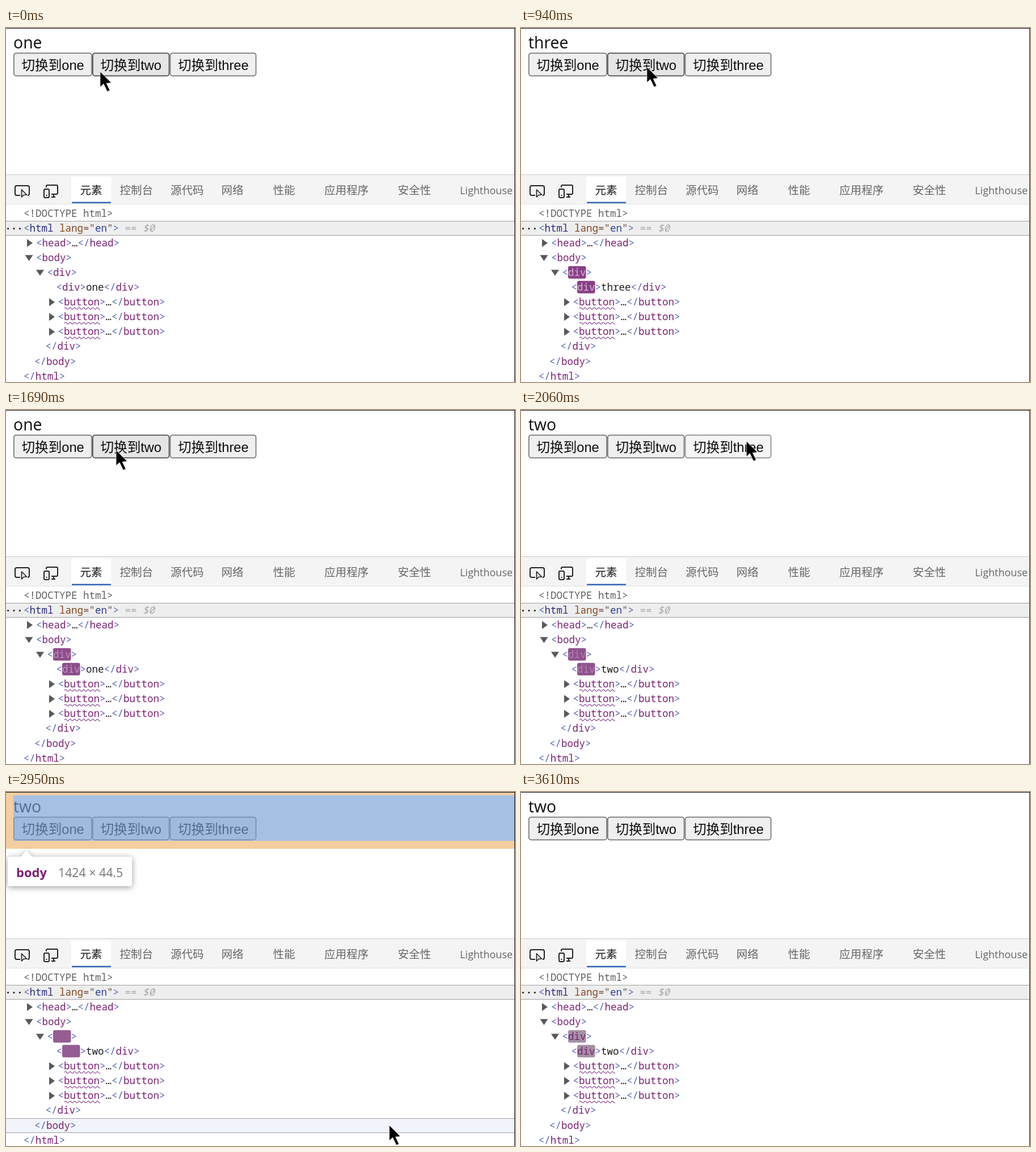
Write an HTML page with a canvas that moves like this. It is 897 by 624 pixels and loops after 3.66 s.

```html
<!DOCTYPE html>
<html lang="zh">
<head>
<meta charset="utf-8">
<style>
html, body { margin: 0; width: 100%; height: 100%; overflow: hidden; background: #fff; }
canvas { display: block; }
</style>
</head>
<body>
<canvas id="stage" width="897" height="624"></canvas>
<script>
const ctx = document.getElementById('stage').getContext('2d');
const LOOP = 3660, TICKS = 78, STEP = LOOP / TICKS;
const ROW = 26.05;
const UI = '"Open Sans", "Noto Sans", "Noto Sans CJK SC", sans-serif';
const CJK = '"Noto Sans CJK SC", "Noto Sans CJK", "Noto Sans", sans-serif';
const BUTTON_FONT = '23.6px "Liberation Sans", "Noto Sans CJK SC", "Noto Sans CJK", sans-serif';
const MONO = '17.5px "Noto Sans Mono", monospace';
const BRACKET = '#5465b4', TAG = '#7b2175';

// aim: where the pointer rests when it clicks the button
const BUTTONS = [
  { name: 'one', x: 13, w: 138.5, aim: [99, 67] },
  { name: 'two', x: 152, w: 136, aim: [196, 71] },
  { name: 'three', x: 288.5, w: 152.5, aim: [398, 55] }
];
const BUTTON_STYLE = {
  rest: ['#efefef', '#767676'],
  hover: ['#e5e5e5', '#4c4c4c'],
  active: ['#f5f5f5', '#8d8d8d']
};

// The pointer sweeps to and fro over the buttons in a steady rhythm.
const HOLD = 90;
const SWEEP = [0, 1, 2, 1];
const clicks = Array.from({ length: 7 }, (_, i) => ({ time: 100 + 336 * i, button: BUTTONS[SWEEP[i % 4]] }));
clicks.push({ time: 2580, button: BUTTONS[1] });

const LEAVE = { time: 2625, at: [178, 66] };
const stops = [
  { time: 0, at: [166, 77] },
  ...clicks.map(c => ({ time: c.time, at: c.button.aim })),
  LEAVE
];
const BODY_ROW = { time: 2956, at: [675, 587] };

const mix = (a, b, k) => a + (b - a) * k;
const mixAll = (a, b, k) => a.map((v, i) => mix(v, b[i], k));
const easeOut = (k, power) => 1 - (1 - Math.min(1, k)) ** power;
const progress = (a, b, t) => (t - a.time) / (b.time - a.time);

function pointerAt(t) {
  // Speeds up towards the lower rows and runs on off the stage.
  if (t >= LEAVE.time) return mixAll(LEAVE.at, BODY_ROW.at, progress(LEAVE, BODY_ROW, t) ** 2);
  const i = stops.findIndex(s => s.time > t);
  const a = stops[i - 1], b = stops[i];
  return mixAll(a.at, b.at, easeOut(progress(a, b, t), 3));
}

function flashAt(age) {
  return [
    mixAll([126, 31, 121], [163, 144, 163], easeOut(age / 1100, 2)),
    mixAll([255, 255, 255], [125, 31, 121], Math.min(1, age / 500))
  ].map(c => `rgb(${c.map(Math.round)})`);
}

function rect(x, y, w, h, color) {
  ctx.fillStyle = color;
  ctx.fillRect(x, y, w, h);
}

function roundRect(x, y, w, h, r, color) {
  ctx.beginPath();
  ctx.roundRect(x, y, w, h, r);
  ctx.fillStyle = color;
  ctx.fill();
}

function polygon(points, color) {
  ctx.beginPath();
  points.forEach(([x, y]) => ctx.lineTo(x, y));
  ctx.closePath();
  ctx.fillStyle = color;
  ctx.fill();
}

function stroke(color, width, path) {
  ctx.strokeStyle = color;
  ctx.lineWidth = width;
  path ? ctx.stroke(new Path2D(path)) : ctx.stroke();
}

function text(str, x, y, font, color) {
  ctx.font = font;
  ctx.fillStyle = color;
  ctx.fillText(str, x, y);
  return x + ctx.measureText(str).width;
}

const rowY = i => 333 + ROW * i;

function code(str, x, row, tagColor = TAG) {
  let inTag = false;
  for (const part of str.match(/<\/?|>|[^<>]+/g)) {
    const bracket = /[<>]/.test(part);
    if (bracket) inTag = part !== '>';
    x = text(part, x, rowY(row), MONO, bracket ? BRACKET : inTag ? tagColor : '#1c1c1c');
  }
  return x;
}

function arrow(x, row, open) {
  const y = rowY(row) - 6;
  polygon(open
    ? [[x - 7, y - 5], [x + 7, y - 5], [x, y + 5.5]]
    : [[x - 5, y - 7], [x + 5, y], [x - 5, y + 7]], '#58595c');
}

function squiggle(x, y, w) {
  ctx.beginPath();
  for (let d = 0; d <= w; d++) ctx.lineTo(x + d, y - 1.6 * Math.sin(d * Math.PI / 4));
  stroke('#8d4a99', 1.2);
}

function drawPage(label, [px, py], pressed) {
  text(label, 13, 36, '28.4px ' + UI, '#0c0c0c');
  for (const b of BUTTONS) {
    const over = py > 43 && py < 85 && px >= b.x && px < b.x + b.w;
    const [fill, line] = BUTTON_STYLE[pressed === b ? 'active' : over ? 'hover' : 'rest'];
    roundRect(b.x + 0.9, 44.3, b.w - 1.4, 40, 4, fill);
    stroke(line, 1.7);
    text('切换到' + b.name, b.x + 14.5, 73.5, BUTTON_FONT, '#0c0c0c');
  }
}

function drawOverlay() {
  rect(13, 6, 883, 80, 'rgba(120,160,215,.66)');
  ctx.beginPath();
  ctx.rect(0, 1, 896, 99);
  ctx.rect(13, 6, 883, 80);
  ctx.fillStyle = 'rgba(238,180,112,.66)';
  ctx.fill('evenodd');

  ctx.save();
  ctx.shadowColor = 'rgba(0,0,0,.4)';
  ctx.shadowBlur = 12;
  ctx.shadowOffsetY = 2;
  ctx.fillStyle = '#fff';
  ctx.fill(new Path2D('M7 114H26L36 103L46 114H218Q222 114 222 118V162Q222 166 218 166H7Q3 166 3 162V118Q3 114 7 114Z'));
  ctx.restore();
  text('body', 18, 150, 'bold 22px ' + UI, TAG);
  text('1424 × 44.5', 92, 150, '21.3px ' + UI, '#757575');
}

function drawIcons() {
  ctx.lineJoin = 'round';
  stroke('#222', 2, 'M25 295H19Q16 295 16 292V281Q16 278 19 278H38Q41 278 41 281V292Q41 295 38 295');
  stroke('#222', 1.7, 'M27.5 285V298L31 294.5L36.5 294Z');
  stroke('#222', 2, 'M71 281V279Q71 277 73 277H89Q91 277 91 279V291Q91 293 89 293H80M80 298H87M84 293V298');
  stroke('#222', 2, 'M69 284H74Q76 284 76 286V297Q76 299 74 299H69Q67 299 67 297V286Q67 284 69 284Z');
  rect(70.5, 294, 2, 2, '#222');
}

function drawToolbar() {
  rect(0, 258, 896, 53, '#f4f4f4');
  rect(0, 258, 896, 1, '#cbcbcb');
  rect(0, 310, 896, 1, '#e2e2e2');
  rect(115, 262, 70.5, 47, '#fff');
  rect(116, 306.5, 69, 2.5, '#3367b5');
  drawIcons();
  const tabs = { 元素: 130.5, 控制台: 200.5, 源代码: 290, 网络: 379.5, 性能: 470.5, 应用程序: 561, 安全性: 690.5 };
  for (const [name, x] of Object.entries(tabs)) {
    text(name, x, 293, '19.5px ' + CJK, name === '元素' ? '#161616' : '#666');
  }
  text('Lighthouse', 800, 292.5, '18px ' + UI, '#666');
}

function band(row, fill) {
  const y = Math.round(rowY(row) - 19);
  rect(0, y, 896, 26, fill);
  rect(0, y, 896, 1, '#9f9f9f');
  rect(0, y + 25, 896, 1, '#9f9f9f');
}

function drawTree(label, flashAge, hoverRow) {
  band(1, '#eee');
  if (hoverRow) band(hoverRow, '#f1f5fb');

  text('<!DOCTYPE html>', 31, rowY(0), MONO, '#606060');
  for (let i = 0; i < 3; i++) roundRect(2 + 10.4 * i, 352, 3.2, 3.2, 1.6, '#222');
  let x = code('<html', 31, 1, '#2d2c80');
  x = text(' lang', x, rowY(1), MONO, '#84461c');
  x = text('="', x, rowY(1), MONO, '#6b4a3a');
  x = text('en', x, rowY(1), MONO, '#2b3f9b');
  x = text('"', x, rowY(1), MONO, '#6b4a3a');
  x = text('>', x, rowY(1), MONO, BRACKET);
  x = text(' == ', x, rowY(1), MONO, '#a8a8a8');
  text('$0', x, rowY(1), 'italic ' + MONO, '#a8a8a8');

  arrow(42, 2, false);
  code('<head>…</head>', 53, 2);
  arrow(40.5, 3, true);
  code('<body>', 53, 3);
  arrow(60, 4, true);
  code('<div>', 72.5, 4);
  code(`<div>${label}</div>`, 88.5, 5);
  for (let row = 6; row < 9; row++) {
    arrow(81, row, false);
    code('<button>…</button>', 91.5, row);
    squiggle(103, rowY(row) + 5, 63);
  }
  ['</div>', '</body>', '</html>'].forEach((tag, i) => code(tag, 69.5 - 19.4 * i, 9 + i));

  if (flashAge < 1400) {
    const [bg, fg] = flashAt(flashAge);
    for (const [left, row] of [[83, 4], [99, 5]]) {
      roundRect(left, rowY(row) - 17.5, 31.5, 22, 3, bg);
      text('div', left, rowY(row), MONO, fg);
    }
  }
}

function drawPointer([x, y]) {
  const shape = [[0, 0], [0, 27], [6, 21.5], [12.5, 35], [17, 33], [11, 20.5], [19.5, 19.5]];
  polygon(shape.map(([dx, dy]) => [x + dx, y + dy]), '#000');
  stroke('rgba(255,255,255,.75)', 0.8);
}

function draw(time) {
  const t = Math.min(TICKS - 1, Math.floor((time % LOOP + 8) / STEP)) * STEP;
  const pointer = pointerAt(t);
  const press = clicks.find(c => t >= c.time - HOLD && t < c.time);
  const last = clicks.findLast(c => t >= c.time);
  const label = last ? last.button.name : 'one';
  // The first click picks the text already shown, so nothing flashes.
  const flashAge = last && last !== clicks[0] ? t - last.time : Infinity;
  const row = Math.round((pointer[1] - 327) / ROW);
  const hoverRow = row > 2 && row < 11 ? row : 0;

  rect(0, 0, 897, 624, '#fff');
  drawPage(label, pointer, press?.button);
  if (hoverRow) drawOverlay();
  drawToolbar();
  drawTree(label, flashAge, hoverRow);
  rect(0, 0, 897, 1, '#111');
  rect(896, 0, 1, 624, '#111');
  drawPointer(pointer);
}

let start;
function tick(now) {
  start ??= now;
  draw(now - start);
  requestAnimationFrame(tick);
}
draw(0);
requestAnimationFrame(tick);
</script>
</body>
</html>
```
